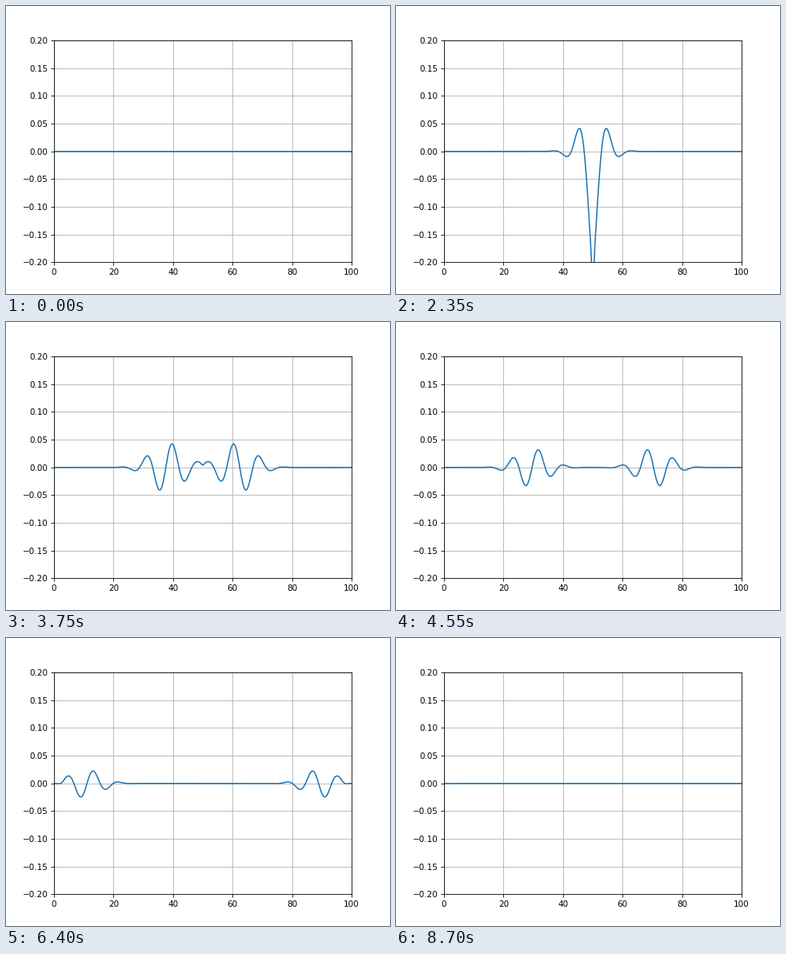
Animation, 480 px wide and 360 px high, one loop 9950 ms. Source, as a matplotlib script:

```python
import numpy as np
import matplotlib.pyplot as plt
from matplotlib.animation import FuncAnimation

FRAMES, INTERVAL = 199, 50
SPEED = 0.5                     # distance per frame
AMP, PERIOD = 0.68, 17.0
PULSE_MID, PULSE_WIDTH, ZERO_AT = 48.4, 15.0, 48.0
EDGE = (0.5, 4.0)               # absorbing layer at both ends

x = np.linspace(0, 100, 200)
r = np.abs(x[:100] - 50)

# Cylindrical wave: integrate the pulse over delays (r / c) cosh(theta)
theta = np.linspace(0, 7.2, 900)
weight = np.full(theta.size, theta[1] - theta[0])
weight[0] /= 2
delay = np.outer(r / SPEED, np.cosh(theta))

fade = np.clip((x[:100] - EDGE[0]) / (EDGE[1] - EDGE[0]), 0, 1)
fade = fade * fade * (3 - 2 * fade)


def pulse(t):
    envelope = np.exp(-((t - PULSE_MID) / PULSE_WIDTH) ** 2)
    return AMP * envelope * np.sin(2 * np.pi * (t - ZERO_AT) / PERIOD)


def wave(t):
    half = fade * (pulse(t - delay) @ weight) / (2 * np.pi)
    return np.concatenate([half, half[::-1]])


fig, ax = plt.subplots(figsize=(6.4, 4.8), dpi=75)
ax.set_xlim(0, 100)
ax.set_ylim(-0.2, 0.2)
ax.set_xticks(np.arange(0, 101, 20))
ax.set_yticks(np.linspace(-0.2, 0.2, 9).round(2))
ax.grid(True)
line, = ax.plot(x, np.zeros_like(x), color="#1f77b4", lw=1.5)


def update(i):
    line.set_ydata(wave(i))
    return line,


anim = FuncAnimation(fig, update, frames=FRAMES, interval=INTERVAL, repeat=True)
plt.show()
```
